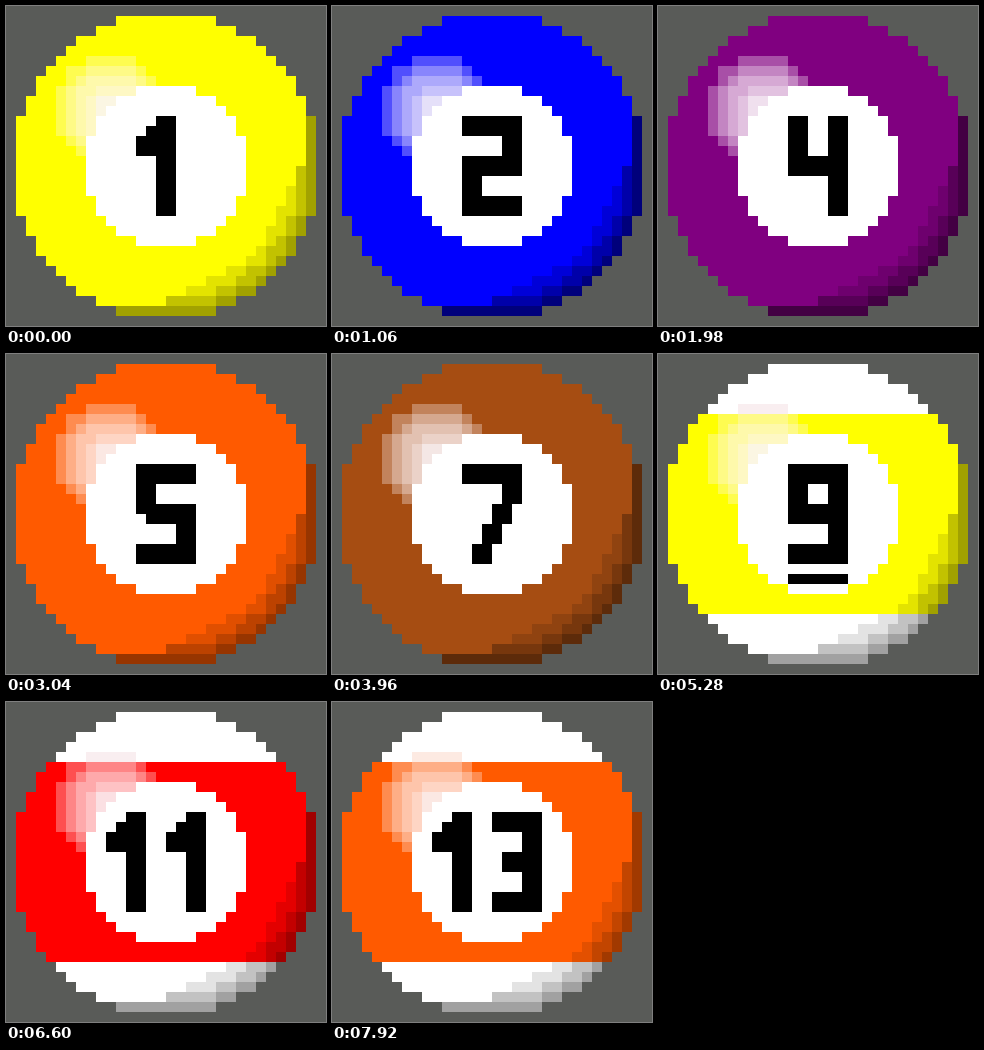
Write an HTML page without scripts that moves like this. It is 320 px wide and 320 px high and loops after 8000 ms.

```html
<!DOCTYPE html>
<html lang="en">
<head>
<meta charset="utf-8">
<title>Pool balls</title>
<style>
html, body { margin: 0; width: 100%; height: 100%; overflow: hidden; background: #595b58; }
svg { display: block; width: 100vw; height: 100vh; }
.ball {
  visibility: hidden;
  animation: turn 8s step-end calc(var(--n) * .66s - 8s) infinite;
}
.ball:last-child { animation-name: last; }
@keyframes turn { 0% { visibility: visible; } 8.25%, 100% { visibility: hidden; } }
@keyframes last { 0% { visibility: visible; } 1%, 100% { visibility: hidden; } }
.dark { opacity: calc(.37 * var(--s, 1)); }
.mid { opacity: calc(.24 * var(--s, 1)); }
.light { opacity: calc(.11 * var(--s, 1)); }
.shine path { fill: #fbf6f8; opacity: .32; }
.shine path:last-child { opacity: .6; }
</style>
</head>
<body>
<svg viewBox="0 0 32 32" shape-rendering="crispEdges">
<defs>
  <path id="disc" d="M11 1H21V2H23V3H25V4H26V5H27V6H28V7H29V9H30V11H31V21H30V23H29V25H28V26H27V27H26V28H25V29H23V30H21V31H11V30H9V29H7V28H6V27H5V26H4V25H3V23H2V21H1V11H2V9H3V7H4V6H5V5H6V4H7V3H9V2H11Z"/>
  <clipPath id="band"><path d="M0 6H32V26H0Z"/></clipPath>
  <g id="shade">
    <path class="dark" d="M11 30H21V31H11ZM21 29H23V30H21ZM23 28H25V29H23ZM25 27H26V28H25ZM26 26H27V27H26ZM27 25H28V26H27ZM28 23H29V25H28ZM29 21H30V23H29ZM30 11H31V21H30Z"/>
    <path class="mid" d="M16 29H21V30H16ZM21 28H23V29H21ZM23 27H25V28H23ZM24 26H26V27H24ZM26 24H27V26H26ZM27 23H28V25H27ZM28 21H29V23H28ZM29 16H30V21H29Z"/>
    <path class="light" d="M18 28H21V29H18ZM20 27H23V28H20ZM22 26H24V27H22ZM24 25H26V26H24ZM25 24H26V25H25ZM26 22H27V24H26ZM27 20H28V23H27ZM28 18H29V21H28Z"/>
  </g>
  <g id="shine" class="shine">
    <path d="M8 5H13V6H14V7H15V8H13V13H8V15H7V14H6V13H5V8H6V6H8Z"/>
    <path d="M8 6H13V7H14V8H13V13H8V14H7V13H6V8H7V7H8Z"/>
    <path d="M8 7H13V13H7V8H8Z"/>
    <path d="M9 8H13V13H8V9H9Z"/>
    <path d="M9 9H13V13H9Z"/>
  </g>
  <path id="spot" fill="#fff" d="M13 8H19V9H21V10H22V11H23V13H24V19H23V21H22V22H21V23H19V24H13V23H11V22H10V21H9V19H8V13H9V11H10V10H11V9H13Z"/>
  <g id="solid">
    <use href="#disc" fill="currentColor"/>
    <use href="#shade"/><use href="#shine"/><use href="#spot"/>
  </g>
  <g id="stripe">
    <use href="#disc" fill="#fff"/>
    <use href="#disc" fill="currentColor" clip-path="url(#band)"/>
    <use href="#shade"/><use href="#shine"/>
    <path fill="var(--tint, #f9eef0)" d="M8 5H13V6H8Z"/>
    <use href="#spot"/>
  </g>
  <path id="one" d="M15 11H17V21H15V15H13V13H14V12H15Z"/>
  <path id="line" d="M13 22H19V23H13Z"/>
  <path id="nine" d="M13 11H19V21H13V19H17V17H13ZM15 13V15H17V13Z" fill-rule="evenodd"/>
</defs>

<g class="ball" style="--n:0;color:#ff0"><use href="#solid"/><use href="#one"/></g>
<g class="ball" style="--n:1;--s:1.4;color:#00f"><use href="#solid"/><path d="M13 11H19V17H15V19H19V21H13V15H17V13H13Z"/></g>
<g class="ball" style="--n:2;--s:1.5;color:#f00"><use href="#solid"/><path d="M13 11H19V21H13V19H17V17H14V15H17V13H13Z"/></g>
<g class="ball" style="--n:3;--s:1.3;color:#800080"><use href="#solid"/><path d="M13 11H15V15H17V11H19V21H17V17H13Z"/></g>
<g class="ball" style="--n:4;--s:1.1;color:#ff5a00"><use href="#solid"/><path d="M13 11H19V13H15V15H19V21H13V19H17V17H14V16H13Z"/></g>
<g class="ball" style="--n:5;--s:1.2;color:#008000"><use href="#solid"/><use href="#nine" transform="rotate(180 16 16)"/><use href="#line"/></g>
<g class="ball" style="--n:6;--s:1.2;color:#a64d12"><use href="#solid"/><path d="M13 11H19V15H18V17H17V19H16V21H14V19H15V17H16V15H17V13H13Z"/></g>
<g class="ball" style="--n:7;color:#000"><use href="#solid"/><path d="M13 11H19V21H13ZM15 13V15H17V13ZM15 17V19H17V17Z" fill-rule="evenodd"/></g>
<g class="ball" style="--n:8;color:#ff0"><use href="#stripe"/><use href="#nine"/><use href="#line"/></g>
<g class="ball" style="--n:9;color:#00f"><use href="#stripe"/><use href="#one" x="-3"/><path d="M16 11H21V21H16ZM18 13V19H19V13Z" fill-rule="evenodd"/></g>
<g class="ball" style="--n:10;color:#f00"><use href="#stripe"/><use href="#one" x="-3"/><use href="#one" x="3"/></g>
<g class="ball" style="--n:11;color:#800080"><use href="#stripe"/><use href="#one" x="-3"/><path d="M16 11H21V17H18V19H21V21H16V15H19V13H16Z"/></g>
<g class="ball" style="--n:12;--tint:#fdeae2;color:#ff5a00"><use href="#stripe"/><use href="#one" x="-3"/><path d="M16 11H21V21H16V19H19V17H17V15H19V13H16Z"/></g>
</svg>
</body>
</html>
```
